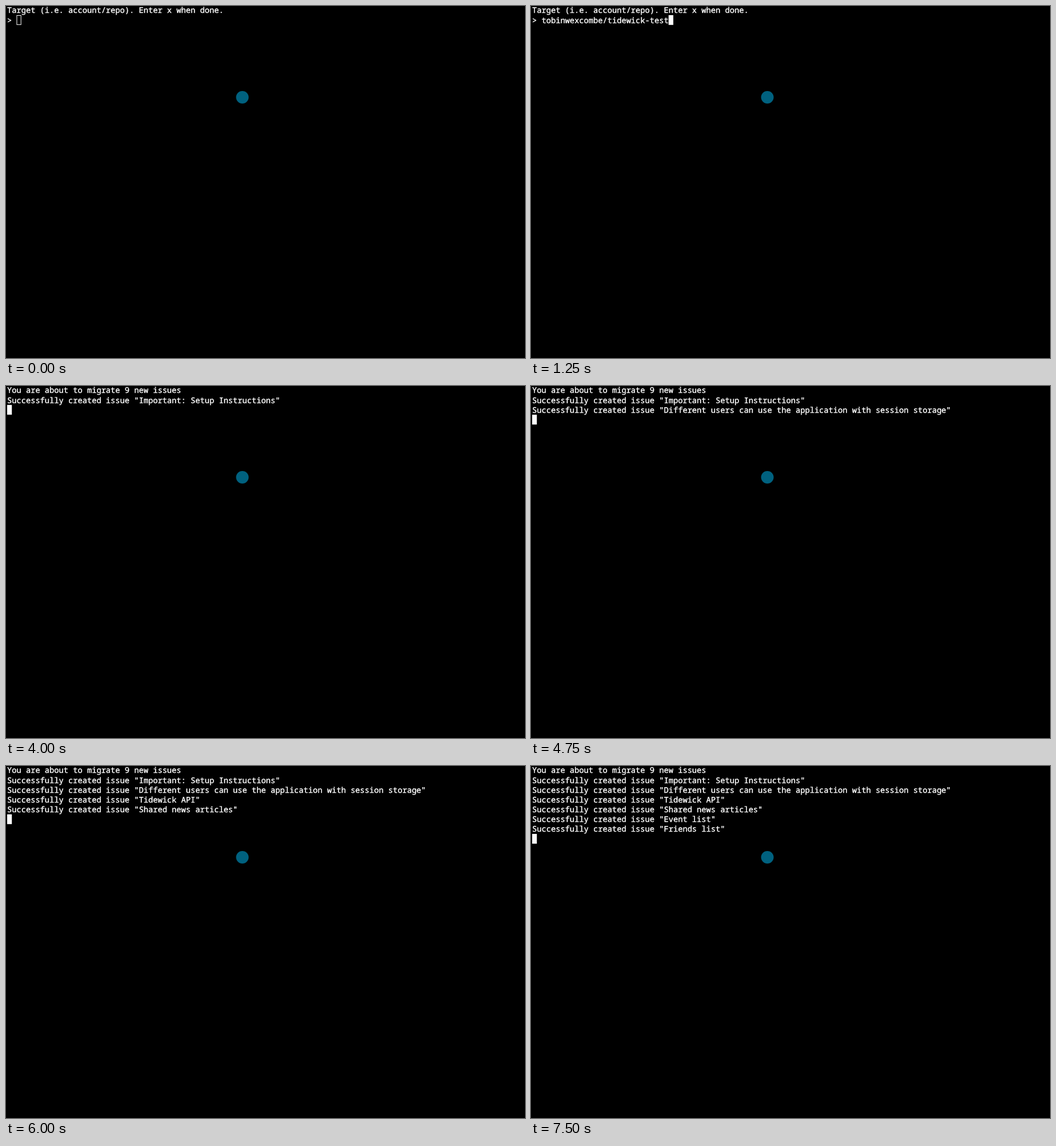
Recreate the animation shown at these times as an HTML page. Size 908x617 px, loop 8000 ms.

```html
<!DOCTYPE html>
<html lang="en">
<head>
<meta charset="utf-8">
<title>Issue migration</title>
<style>
  html, body { margin: 0; width: 100%; height: 100%; overflow: hidden; background: #000; }
  svg { display: block; width: 100%; height: 100%; }
  text {
    font: 500 13.72px "Noto Sans Mono", "DejaVu Sans Mono", monospace;
    fill: #fff;
    stroke: #fff;
    stroke-width: 0.4px;
    text-rendering: geometricPrecision;
    white-space: pre;
  }
</style>
</head>
<body>
<svg viewBox="0 0 908 617">
  <rect width="908" height="617"/>
  <g id="lines"></g>
  <rect id="cursor" stroke="#fff"/>
  <circle id="pointer" cx="413.5" cy="160" r="11" fill="#00617f"/>
  <circle id="spinner" cx="413.5" cy="171" r="13" fill="none" stroke="#00617f"
          stroke-width="4" pathLength="100" stroke-dasharray="75 25"/>
</svg>
<script>
const LOOP = 8000, STEP = 250;
const CHAR = 8.232, ROW = 17.17, LEFT = 2;
const FOCUS = 500, PASTE = 1250, MIGRATE = 3250;
const repo = "tobinwexcombe/tidewick-test";
const issues = [
  [4000, "Important: Setup Instructions"],
  [4750, "Different users can use the application with session storage"],
  [5250, "Tidewick API"],
  [6000, "Shared news articles"],
  [6750, "Event list"],
  [7250, "Friends list"]
];

const byId = id => document.getElementById(id);
const set = (el, attrs) => Object.entries(attrs).forEach(([k, v]) => el.setAttribute(k, v));
const show = (el, on) => set(el, { visibility: on ? "visible" : "hidden" });

const cursor = byId("cursor"), pointer = byId("pointer"), spinner = byId("spinner");
const rows = Array.from({ length: issues.length + 1 }, (_, i) => {
  const el = document.createElementNS("http://www.w3.org/2000/svg", "text");
  set(el, { x: LEFT, y: Math.round(12.4 + ROW * i) });
  return byId("lines").appendChild(el);
});

function screenAt(t) {
  if (t < MIGRATE) {
    return ["Target (i.e. account/repo). Enter x when done.", "> " + (t < PASTE ? "" : repo)];
  }
  const created = issues.filter(([at]) => t >= at)
    .map(([, title]) => `Successfully created issue "${title}"`);
  return ["You are about to migrate 9 new issues", ...created, ""];
}

function drawCursor(row, col, focused) {
  const inset = focused ? 0 : 0.5;
  set(cursor, {
    x: LEFT + col * CHAR + inset,
    y: ROW * (row - 1) + 16 + inset,
    width: CHAR - 2 * inset,
    height: ROW - 2 * inset,
    fill: focused ? "#fff" : "none",
    "stroke-width": focused ? 0 : 1
  });
}

function render(t) {
  const screen = screenAt(t);
  rows.forEach((el, i) => {
    const line = screen[i] || "";
    if (el.textContent !== line) el.textContent = line;
  });
  const last = screen.length - 1;
  drawCursor(last, screen[last].length, t >= FOCUS);

  // The pointer turns into a busy spinner until the paste lands.
  const busy = t >= FOCUS && t < PASTE;
  show(pointer, !busy);
  show(spinner, busy);
  const turn = Math.floor((t - FOCUS) / STEP) * 120;
  set(spinner, { transform: `rotate(${turn} 413.5 171)` });
}

const start = performance.now();
function tick() {
  render((performance.now() - start) % LOOP);
  requestAnimationFrame(tick);
}
tick();
</script>
</body>
</html>
```
